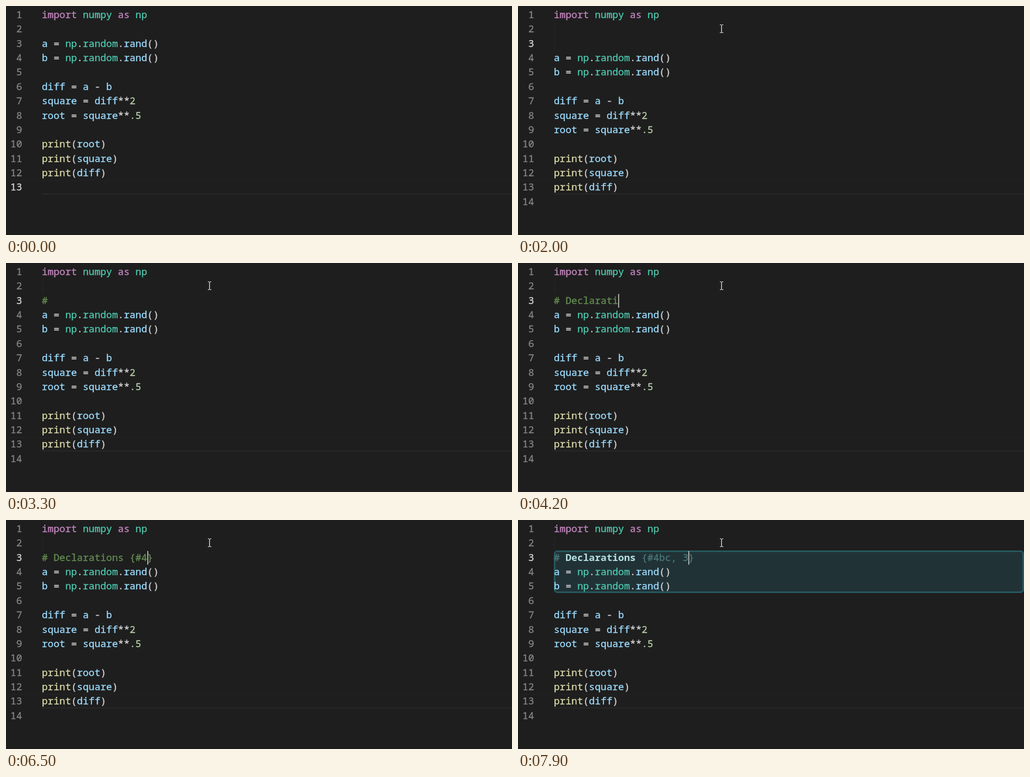
Write an HTML page with a canvas that moves like this. It is 960x436 px and loops after 8000 ms.

```html
<!DOCTYPE html>
<html lang="en">
<head>
<meta charset="utf-8">
<title>Code editor</title>
<style>
  html, body { margin: 0; width: 100%; height: 100%; overflow: hidden; background: #1e1e1e; }
  canvas { display: block; }
</style>
</head>
<body>
<canvas id="stage" width="960" height="436"></canvas>
<script>
const ctx = document.getElementById('stage').getContext('2d');
const LOOP = 8000, LEFT = 68, CHAR = 11.1, PITCH = 27.36;
const FONT = '18.5px "Noto Sans Mono", "DejaVu Sans Mono", monospace';
const CLICK = 900, ENTER = 1500, BOX = 7900;

const colors = {
  k: '#c586c0', t: '#4ec9b0', v: '#9cdcfe', f: '#dcdcaa',
  o: '#d4d4d4', n: '#b5cea8', c: '#638d51', d: '#4a7779', h: '#b4e2e6'
};

// Tokens are split by "|"; the first letter of each is its colour key.
const code = [
  'kimport |tnumpy |kas |tnp',
  '',
  'va |o= |tnp|o.|trandom|o.|vrand|o()',
  'vb |o= |tnp|o.|trandom|o.|vrand|o()',
  '',
  'vdiff |o= |va |o- |vb',
  'vsquare |o= |vdiff|o**|n2',
  'vroot |o= |vsquare|o**|n.5',
  '',
  'fprint|o(|vroot|o)',
  'fprint|o(|vsquare|o)',
  'fprint|o(|vdiff|o)',
  ''
];

// Key presses in the comment line, as [time, character].
const keys = [[2700, '#'], [2800, ' ']];
[...'Declarations '].forEach((ch, i) => keys.push([3400 + i * 100, ch]));
keys.push([4800, '{'], [5400, '#'], [6200, '4'], [6700, 'b'], [6800, 'c'],
          [7100, ','], [7200, ' '], [7900, '3']);

const mousePath = [[300, 215, 300], [600, 300, 150], [900, 364, 46], [1000, 386, 43]];

const baseline = row => Math.round(23 + row * PITCH);
const colX = col => LEFT + col * CHAR;

// A hairline stroke gives the text its slightly heavier weight.
function write(text, x, row, color, bold) {
  ctx.font = (bold ? 'bold ' : '') + FONT;
  ctx.fillStyle = ctx.strokeStyle = color;
  ctx.lineWidth = 0.35;
  ctx.fillText(text, x, baseline(row));
  if (!bold) ctx.strokeText(text, x, baseline(row));
}

function writeTokens(line, row) {
  let col = 0;
  for (const token of line.split('|')) {
    const text = token.slice(1);
    write(text, colX(col), row, colors[token[0]], token[0] === 'h');
    col += text.length;
  }
}

function bar(x, y, w, h, color) {
  ctx.fillStyle = color;
  ctx.fillRect(x, y, w, h);
}

function drawBox() {
  ctx.beginPath();
  ctx.roundRect(69.5, 59.5, 889, 78, 5);
  ctx.fillStyle = '#213236';
  ctx.fill();
  ctx.strokeStyle = '#25595e';
  ctx.lineWidth = 3;
  ctx.stroke();
}

function drawMouse(t) {
  if (t < mousePath[0][0]) return;
  let [, x, y] = mousePath[mousePath.length - 1];
  for (let i = 1; i < mousePath.length; i++) {
    const [t0, x0, y0] = mousePath[i - 1], [t1, x1, y1] = mousePath[i];
    if (t < t1) {
      const p = (t - t0) / (t1 - t0);
      x = Math.round(x0 + (x1 - x0) * p);
      y = Math.round(y0 + (y1 - y0) * p);
      break;
    }
  }
  bar(x - 0.5, y - 7, 1.5, 15, '#d6d6d6');
  for (const edge of [y - 8, y + 7]) {
    bar(x - 3, edge, 2.5, 1.3, '#d6d6d6');
    bar(x + 1, edge, 2.5, 1.3, '#d6d6d6');
  }
}

function draw(t) {
  bar(0, 0, 960, 436, '#1e1e1e');
  bar(0, 332, 960, 1, '#242424');
  bar(LEFT, 357, 892, 2, '#282828');

  const typed = keys.filter(k => k[0] <= t);
  const text = typed.map(k => k[1]).join('');
  const boxed = t >= BOX, entered = t >= ENTER;
  const lines = code.slice();
  if (entered) {
    const full = text + (text.includes('{') ? '}' : '');
    lines.splice(2, 0, boxed ? 'd# |hDeclarations|d' + full.slice(14) : 'c' + full);
  }

  if (t >= CLICK) bar(LEFT + 1, 32, 1, entered && !text ? 52 : 26, '#282828');
  if (boxed) drawBox();

  const active = t < CLICK ? 12 : entered ? 2 : 1;
  lines.forEach((line, row) => {
    ctx.textAlign = 'right';
    write(String(row + 1), 30.5, row, row === active ? '#d8d8d8' : '#858585');
    ctx.textAlign = 'left';
    if (line) writeTokens(line, row);
  });

  // The caret shows for half a second after each action, then blinks.
  const since = typed.length ? typed[typed.length - 1][0]
    : entered ? ENTER : t >= CLICK ? CLICK : -500;
  if (Math.floor((t - since) / 500) % 2 === 0) {
    bar(Math.round(colX(text.length)), Math.round(4 + active * PITCH), 2, 26, '#aeafad');
  }
  drawMouse(t);
}

function frame(now) {
  draw(Math.floor(now % LOOP / 100) * 100);
  requestAnimationFrame(frame);
}
draw(0);
requestAnimationFrame(frame);
</script>
</body>
</html>
```
